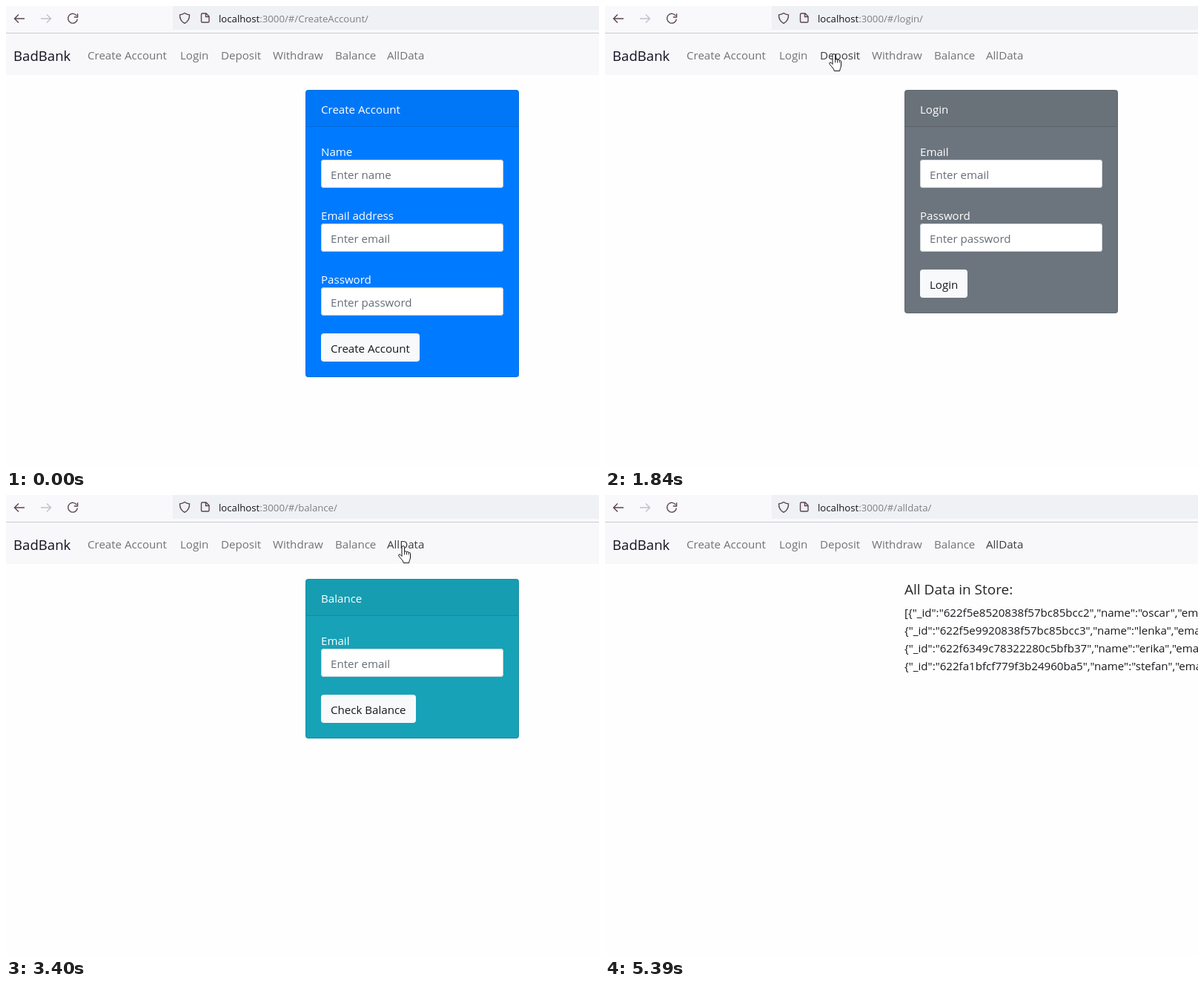
Recreate the animation shown at these times as an HTML page with a canvas. Size 800x621 px, loop 5.99 s.

```html
<!DOCTYPE html>
<html lang="en">
<head>
<meta charset="utf-8">
<title>Bank demo</title>
<style>
  html, body { margin: 0; width: 100%; height: 100%; overflow: hidden; background: #fefefe; }
  canvas { display: block; }
</style>
</head>
<body>
<canvas id="stage" width="800" height="621"></canvas>
<script>
const ctx = document.getElementById('stage').getContext('2d', { alpha: false });
const LOOP = 5990;
const FONT = '"Open Sans", "Noto Sans", sans-serif';
const BODY = 15.1;
const INK = '#17191d';

const links = [
  ['Create Account', 110], ['Login', 235], ['Deposit', 290],
  ['Withdraw', 360], ['Balance', 444], ['AllData', 514]
];
const NAV_END = 581;

const email = ['Email', 'Enter email'];
const amount = ['Amount', 'Enter amount', true];
const password = ['Password', 'Enter password'];
const pages = [
  { path: 'CreateAccount', title: 'Create Account', color: '#007bff', button: 'Create Account',
    fields: [['Name', 'Enter name'], ['Email address', 'Enter email'], password] },
  { path: 'login', title: 'Login', color: '#6c757d', button: 'Login', fields: [email, password] },
  { path: 'deposit', title: 'Deposit', color: '#ffc107', button: 'Deposit', fields: [email, amount] },
  { path: 'withdraw', title: 'Withdraw', color: '#28a745', button: 'Withdraw', fields: [email, amount] },
  { path: 'balance', title: 'Balance', color: '#17a2b8', button: 'Check Balance', fields: [email] },
  { path: 'alldata' }
];
const records = [
  ['622f5e8520838f57bc85bcc2', 'oscar'],
  ['622f5e9920838f57bc85bcc3', 'lenka'],
  ['622f6349c78322280c5bfb37', 'erika'],
  ['622fa1bfcf779f3b24960ba5', 'stefan']
];

// Each click: link and page index, press, highlight on, page shown
const clicks = [
  [1, 1390, 1390, 1530], [2, 1840, 1920, 1990], [3, 2250, 2250, 2390],
  [4, 2790, 2790, 2930], [5, 3400, 3470, 3530]
];

const linear = p => p;
const easeOut = p => 1 - (1 - p) ** 2;
const easeInOut = p => p * p * (3 - 2 * p);

// Pointer moves: first step, last step, number of steps, end point, easing
const moves = [
  [180, 310, 3, 325, 276, linear],
  [510, 1060, 9, 263, 64, easeOut],
  [1200, 1280, 2, 260, 61, linear],
  [1560, 1620, 2, 263, 64, linear],
  [1770, 1840, 2, 307, 65, linear],
  [2050, 2250, 4, 392, 69, easeInOut],
  [2530, 2790, 4, 454, 68, easeInOut],
  [2990, 3120, 3, 515, 70, easeInOut],
  [3330, 3400, 2, 534, 69, linear],
  [3720, 4260, 8, 180, 71, easeInOut],
  [4330, 4330, 1, 444, 191, linear],
  [5320, 5320, 1, 779, 610, linear]
];

const handShape = new Path2D('M5 14.5V2.4a1.8 1.8 0 0 1 3.6 0V8.6a1.6 1.6 0 0 1 2.9.3' +
  'a1.6 1.6 0 0 1 2.7.6a1.5 1.5 0 0 1 2.3 1.4V16c0 3.2-1.7 4-1.8 7.4H7.2' +
  'C7 20 3.4 18 1 14.2c-1-1.7.8-2.9 2-1.8Z');
const knuckles = new Path2D('M8.6 8.5V12.5M11.5 9V12.5M14.2 9.6V12.5');
const arrowShape = new Path2D('M.5.5V16.5l3.7-3.6 2.4 5.6 2.4-1-2.4-5.5h4.9Z');
const shield = new Path2D('M241 9.5c2 1.5 4.2 2.2 6.5 2.4c.2 5-1.7 9-6.5 11.4' +
  'c-4.8-2.4-6.7-6.4-6.5-11.4c2.3-.2 4.5-.9 6.5-2.4Z');
const sheet = new Path2D('M265 10h5l4 4v6.5a1.5 1.5 0 0 1-1.5 1.5h-7.5a1.5 1.5 0 0 1-1.5-1.5' +
  'v-9a1.5 1.5 0 0 1 1.5-1.5ZM269.5 10v4.5h4.5');
const backArrow = new Path2D('M25 17H11.5M17 11.5L11.5 17L17 22.5');
const nextArrow = new Path2D('M47 17H60.5M55 11.5L60.5 17L55 22.5');
const reload = new Path2D('M95.4 13.2A6.4 6.4 0 1 0 96.4 17.6M96.6 10.2V15H91.8');

function text(str, x, y, color, size = BODY) {
  ctx.font = `${size}px ${FONT}`;
  ctx.fillStyle = color;
  ctx.fillText(str, x, y);
  return ctx.measureText(str).width;
}

function rect(x, y, w, h, color) {
  ctx.fillStyle = color;
  ctx.fillRect(x, y, w, h);
}

function line(path, color, width) {
  ctx.strokeStyle = color;
  ctx.lineWidth = width;
  ctx.stroke(path);
}

function rounded(x, y, w, h, r) {
  const path = new Path2D();
  path.roundRect(x, y, w, h, r);
  return path;
}

function box(x, y, w, h, fill, border) {
  ctx.fillStyle = fill;
  ctx.fill(rounded(x, y, w, h, 4));
  if (border) line(rounded(x + .5, y + .5, w - 1, h - 1, 3.5), border, 1);
}

function drawBrowser(path) {
  rect(0, 0, 800, 36, '#f9f9fb');
  rect(225, 0, 575, 32, '#eff1f4');
  rect(0, 36, 800, 1, '#cccccf');
  line(nextArrow, '#c4bfcb', 1.4);
  for (const icon of [backArrow, reload, shield, sheet]) line(icon, '#5b4450', 1.4);
  const w = text('localhost', 287, 22, '#15141a', 13.2);
  text(`:3000/#/${path}/`, 287 + w, 22, '#7f7f86', 13.2);
}

function drawNav(hovered, focused) {
  rect(0, 37, 800, 56, '#f8f8fb');
  text('BadBank', 10, 74, '#121220', 18.6);
  links.forEach(([label, x], i) => {
    const active = i === hovered || i === focused;
    text(label, x, 72, active ? 'rgba(0,0,0,.76)' : 'rgba(0,0,0,.54)');
  });
}

function drawSpinner(y) {
  rect(640, y + 10, 18, 18, '#e9e9ed');
  const chevrons = `M645.5 ${y + 17}l3.5-3.5l3.5 3.5M645.5 ${y + 21.5}l3.5 3.5l3.5-3.5`;
  line(new Path2D(chevrons), '#6a6a72', 1.2);
}

function drawCard({ title, color, button, fields }) {
  const buttonY = 183 + 86 * fields.length;
  box(404, 113, 288, buttonY + 59 - 113, color, 'rgba(0,0,0,.125)');
  rect(405, 114, 286, 48, 'rgba(0,0,0,.03)');
  rect(405, 162, 286, 1, 'rgba(0,0,0,.15)');
  text(title, 425, 145, '#fff');
  fields.forEach(([label, hint, numeric], i) => {
    const y = 207 + 86 * i;
    text(label, 425, y - 5, '#fff');
    box(425, y, 246, 38, '#fff', '#ced4da');
    text(hint, 438, y + 26, '#656d75');
    if (numeric) drawSpinner(y);
  });
  ctx.font = `${BODY}px ${FONT}`;
  box(425, buttonY, Math.round(ctx.measureText(button).width) + 26, 38, '#f8f9fa');
  text(button, 438, buttonY + 26, INK);
}

function drawRecords() {
  text('All Data in Store:', 404, 134, '#212529', 19);
  records.forEach(([id, name], i) => {
    const start = i ? '' : '[';
    text(`${start}{"_id":"${id}","name":"${name}","email":"`, 404, 164 + 24 * i, INK);
  });
}

function pointerAt(t) {
  if (t < 180 || (t >= 4400 && t < 5320) || t >= 5390) return null;
  let x = 577, y = 472;
  for (const [start, end, steps, toX, toY, ease] of moves) {
    if (t < start) break;
    const done = t >= end ? 1
      : (Math.floor((t - start) / (end - start) * (steps - 1)) + 1) / steps;
    const p = ease(done);
    x += (toX - x) * p;
    y += (toY - y) * p;
  }
  return { x: Math.round(x), y: Math.round(y) };
}

function linkAt(p) {
  if (!p || p.y < 45 || p.y >= 85 || p.x >= NAV_END - 8) return -1;
  return links.findLastIndex(([, x]) => p.x >= x - 8);
}

function drawPointer(p, hand, ring) {
  if (ring) {
    ctx.beginPath();
    ctx.arc(p.x, p.y, 12, 0, Math.PI * 2);
    ctx.fillStyle = 'rgba(255,240,30,.68)';
    ctx.fill();
  }
  ctx.save();
  ctx.translate(p.x - (hand ? 5 : 0), p.y - (hand ? 1 : 0));
  const shape = hand ? handShape : arrowShape;
  ctx.fillStyle = '#fff';
  ctx.fill(shape);
  line(shape, '#111', 1);
  if (hand) line(knuckles, '#111', .9);
  ctx.restore();
}

function draw(t) {
  let page = 0, focused = -1, ring = false;
  for (const [target, press, ringOn, shown] of clicks) {
    if (t >= press) focused = target;
    if (t >= shown) page = target;
    if (t >= ringOn && t < shown) ring = true;
  }
  const pointer = pointerAt(t);
  const hovered = linkAt(pointer);

  rect(0, 0, 800, 621, '#fefefe');
  drawBrowser(pages[page].path);
  drawNav(hovered, focused);
  if (pages[page].fields) drawCard(pages[page]);
  else drawRecords();
  if (pointer) drawPointer(pointer, hovered >= 0, ring);
}

const begin = performance.now();
function tick() {
  draw((performance.now() - begin) % LOOP);
  requestAnimationFrame(tick);
}
tick();
</script>
</body>
</html>
```
